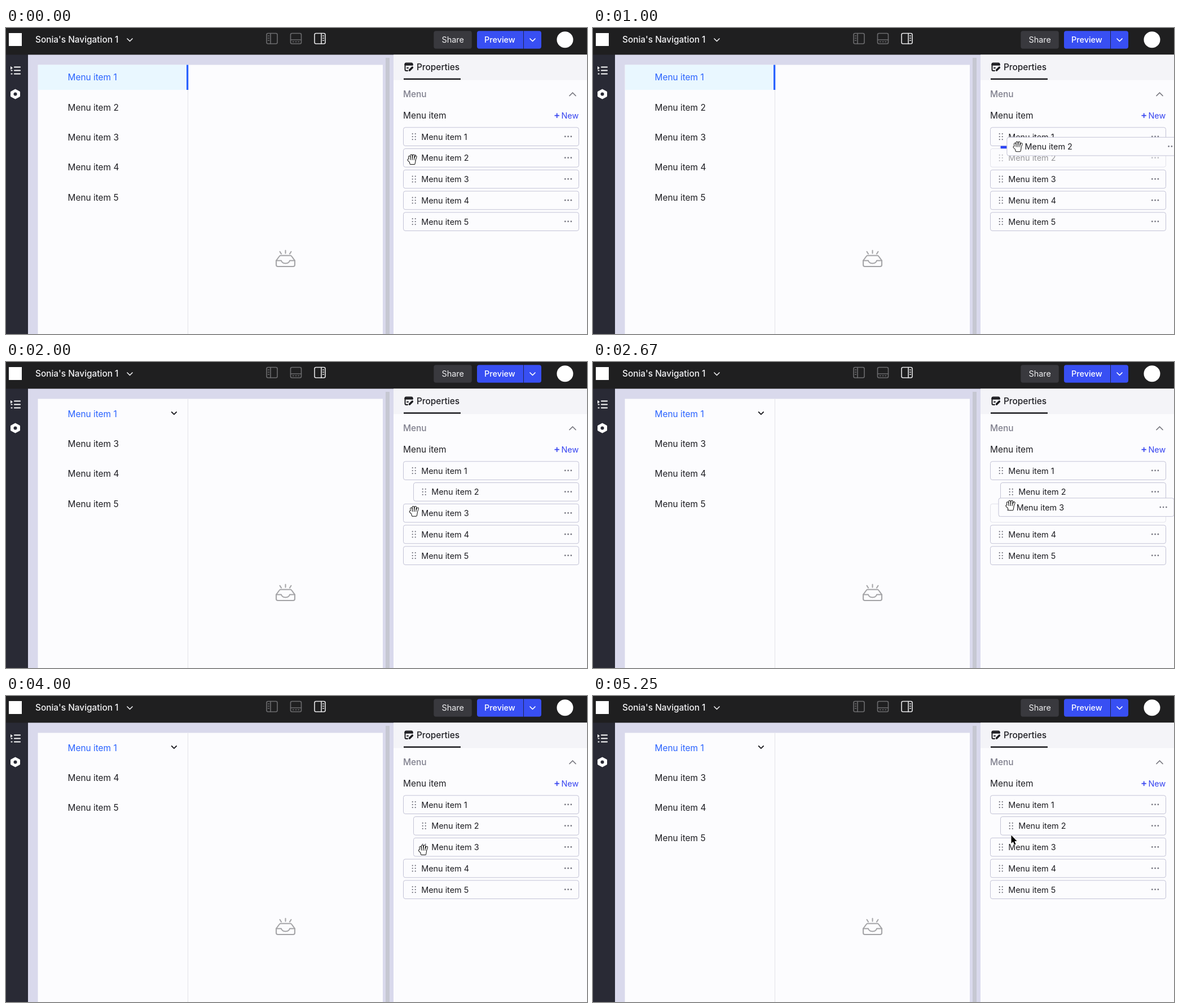
Animation, 1030 px wide and 544 px high, one loop 5580 ms. Source, as an HTML page:

```html
<!DOCTYPE html>
<html lang="en">
<head>
<meta charset="utf-8">
<title>Menu editor</title>
<style>
  html, body { margin: 0; width: 100%; height: 100%; overflow: hidden; background: #fcfcfe; }
  svg { display: block; width: 1030px; height: 544px; font-family: Inter, sans-serif; }
  text { fill: #1d1d22; font-size: 15.4px; white-space: pre; }
  .small { font-size: 14.4px; }
  .medium { font-weight: 500; }
  .line { fill: none; stroke-linecap: round; stroke-linejoin: round; }
  .box { fill: #fcfcfe; stroke: #c3c3d6; }
  .dots { fill: #74747f; }
  .active { fill: #2962ff; }
  .hand { fill: #fff; stroke-linecap: round; stroke-linejoin: round; }
</style>
</head>
<body>
<svg viewBox="0 0 1030 544">
  <defs>
    <path id="open" d="M-5 1L-5.500-4.500M-1.800 0L-2-7M1.400 0L2-7M4.400 0L6-4.500M-7 1L-4 4M-4 2H4L3 7.500H-3Z"/>
    <path id="index" d="M0 1V12M3.400 6V10M6.200 6.500V10M8.700 7.500V10M-3.300 9.500L0 12.500M0 11.500H8L7 16H1.500Z"/>
  </defs>
  <rect width="1030" height="544" fill="#fcfcfe"/>

  <!-- canvas -->
  <rect x="39" y="47" width="648" height="497" fill="#d9d9ec"/>
  <rect x="673" y="53" width="7" height="491" fill="#c6c7d2"/>
  <rect x="56.5" y="65.5" width="611.5" height="479" fill="#fcfcfe"/>
  <path d="M322.5 66V544" stroke="#e3e3e9"/>
  <g id="nav"></g>
  <g class="line" stroke="#a3a3a6" stroke-width="2">
    <path d="M479 413.5L484.5 406Q485.5 404.5 487 404.5H504Q505.5 404.5 506.5 406L512 413.5V421Q512 424 509 424H482Q479 424 479 421Z"/>
    <path d="M479 413.5H488Q489.5 418.5 495.5 418.5T503 413.5H512M495.5 395.5V400.5M485.5 397.5L488 401.5M505.5 397.5L503 401.5"/>
  </g>

  <!-- side bar -->
  <rect y="47" width="39" height="497" fill="#292a35"/>
  <path d="M8 68V74L12 71Z" fill="#fff"/>
  <path class="line" d="M15 69.5H25M15 75.5H25M15 81.5H25M9.5 75.5H10.5M9.5 81.5H10.5" stroke="#fff" stroke-width="2.2"/>
  <path d="M16.5 109L24.5 113.3V121.7L16.5 126L8.5 121.7V113.3Z" fill="#fff" stroke="#fff" stroke-linejoin="round"/>
  <circle cx="16.5" cy="117.5" r="3" fill="#292a35"/>

  <!-- top bar -->
  <rect width="1030" height="47.5" fill="#1f1f20"/>
  <rect x="5" y="9" width="23" height="23" fill="#fff"/>
  <text class="medium" x="52" y="26.3" style="fill:#f4f4f6">Sonia's Navigation 1</text>
  <path class="line" d="M215 19L219.5 23.5L224 19" stroke="#e8e8ea" stroke-width="1.7"/>
  <g class="line" stroke="#6c6c6e" stroke-width="1.6">
    <rect x="462" y="9.5" width="19" height="18.5" rx="2.5"/>
    <path d="M469 9.5V28M464.5 14H466.5M464.5 18H466.5M464.5 22H466.5"/>
    <rect x="504.5" y="9.5" width="19" height="18.5" rx="2.5"/>
    <path d="M504.5 21H523.5M508.5 24.5H510M513.3 24.5H514.8M518 24.5H519.5"/>
  </g>
  <g class="line" stroke="#e6e6e8" stroke-width="1.6">
    <rect x="547" y="9.5" width="19" height="18.5" rx="2.5"/>
    <path d="M559 9.5V28M561.5 14H563.5M561.5 18H563.5M561.5 22H563.5"/>
  </g>
  <rect x="758.3" y="5.3" width="67.5" height="31.4" rx="4" fill="#39393e"/>
  <text class="small" x="772.5" y="26.2" style="fill:#f0f0f2">Share</text>
  <rect x="835" y="5.3" width="114" height="31.4" rx="4" fill="#384ff3"/>
  <path d="M917.5 5V37" stroke="#20254e"/>
  <text class="small medium" x="848" y="26.2" style="fill:#fff">Preview</text>
  <path class="line" d="M929 19L933.5 23.5L938 19" stroke="#fff" stroke-width="1.7"/>
  <circle cx="991" cy="20.7" r="14.5" fill="#fff"/>

  <!-- properties -->
  <rect x="687" y="47.5" width="343" height="45" fill="#f4f4f8"/>
  <g class="line" stroke="#1c1c20" stroke-width="2">
    <path d="M712 76H709.5Q707.5 76 707.5 74V64.5Q707.5 62.5 709.5 62.5H718.5Q720.5 62.5 720.5 64.5V66M711 71H713"/>
    <path d="M708 65H720" stroke-width="3.5"/>
    <path d="M715.5 75L720.3 70.2" stroke-width="3.6"/>
  </g>
  <text class="medium" x="728" y="75.3">Properties</text>
  <rect x="705" y="89.5" width="101" height="2.5" fill="#1c1c20"/>
  <text class="medium" x="704" y="123.2" style="fill:#7e7e8c">Menu</text>
  <path class="line" d="M999 120.5L1004.5 115L1010 120.5" stroke="#74747c" stroke-width="1.7"/>
  <text x="704" y="161.1">Menu item</text>
  <path class="line" d="M973.2 155.7H980.2M976.7 152.2V159.2" stroke="#3644f0" stroke-width="1.7"/>
  <text class="small" x="984.5" y="160.9" style="fill:#3644f0">New</text>

  <g id="rows"></g>
  <rect id="marker" height="4.5" rx="1" fill="#2b44f5"/>
  <g id="card"></g>

  <g id="cursors">
    <g id="grab" class="hand">
      <use href="#open" stroke="#111" stroke-width="4.2"/><use href="#open" stroke="#fff" stroke-width="2.2"/>
    </g>
    <g id="point" class="hand">
      <use href="#index" stroke="#111" stroke-width="4.2"/><use href="#index" stroke="#fff" stroke-width="2.2"/>
    </g>
    <path id="arrow" d="M0 0V14.5L3.3 11.5L5.6 17L8 16L5.8 10.6H10Z" fill="#000" stroke="#fff" stroke-width="1.2" paint-order="stroke"/>
  </g>
</svg>
<script>
const LOOP = 5580, LAG = 40;
const LEFT = 704.5, RIGHT = 1015.5, INDENT = 18;
const TOP = 176.8, PITCH = 37.75, HEIGHT = 32.7, HANDLE = 18.7;
const ITEMS = [1, 2, 3, 4, 5];
const $ = id => document.getElementById(id);
const rowTop = n => TOP + PITCH * (n - 1);

// The mouse rests, then glides to the next place.
const home = { x: 720.5, y: 233.5 };
const glides = [
  { start: 600, end: 1150, x: 761, y: 205.5 },
  { start: 1670, end: 2050, x: 722, y: 268 },
  { start: 2420, end: 2830, x: 750, y: 248 },
  { start: 3500, end: 3900, x: 740, y: 273.5 },
  { start: 4000, end: 4500, x: 710.5, y: 298.5 },
  { start: 4670, end: 5250, x: 741.5, y: 247.4 }
];
const drags = [
  { item: 2, start: 420, end: 1420, nest: true },
  { item: 3, start: 2420, end: 3170, nest: true },
  { item: 3, start: 4000, end: 4750, nest: false }
];

function mouseAt(t) {
  return glides.reduce((from, to) => {
    const u = Math.min(1, Math.max(0, (t - to.start) / (to.end - to.start)));
    const k = u * u * (3 - 2 * u);
    return { x: from.x + (to.x - from.x) * k, y: from.y + (to.y - from.y) * k };
  }, home);
}

function sampleTime(t) {
  if (t < 420) return 0;
  const phase = (t - 420) % 250;
  return t - phase + (phase < 80 ? 0 : 80);
}

const dot = (x, y, r) => `<circle cx="${x}" cy="${y}" r="${r}"/>`;

function rowMarkup(n, x, y, width, opacity = 1) {
  const mid = HEIGHT / 2;
  let dots = '';
  for (const i of [-1, 0, 1]) {
    for (const side of [-2.5, 2.5]) dots += dot(HANDLE + side, mid + 5 * i, 1.1);
    dots += dot(width - 18.9 + 5.3 * i, mid - .2, 1.35);
  }
  return `<g transform="translate(${x} ${y})">
    <rect class="box" width="${width}" height="${HEIGHT}" rx="3.5" style="stroke-opacity:${opacity}"/>
    <g opacity="${opacity}"><g class="dots">${dots}</g>
    <text class="small" x="31.7" y="${mid + 5.4}">Menu item ${n}</text></g></g>`;
}

function navMarkup(nested) {
  const flat = !nested.size;
  const extra = flat
    ? '<path d="M57 65.5H323V110H57Z" fill="#e9f7ff"/><path d="M320 65.5H323.3V110H320Z" fill="#2962ff"/>'
    : '<path class="line" d="M293.7 89L297.9 93.2L302.1 89" stroke="#1d1d22" stroke-width="1.8"/>';
  return extra + ITEMS.filter(n => !nested.has(n)).map((n, i) =>
    `<text x="109.6" y="${(flat ? 93.3 : 97.6) + i * 53.3}" class="${i ? '' : 'active'}">Menu item ${n}</text>`).join('');
}

function cursorKind(mouse, left) {
  const n = ITEMS.find(n => mouse.y >= rowTop(n) && mouse.y <= rowTop(n) + HEIGHT);
  if (!n) return 'arrow';
  return Math.abs(mouse.x - left(n) - HANDLE) < 8 ? 'grab' : 'point';
}

function drawMarker(item, dx, dy) {
  const marker = $('marker');
  const visible = Math.hypot(dx, dy) > 12;
  marker.style.display = visible ? '' : 'none';
  if (!visible) return;
  // Pulling right nests under the row above, pulling left moves out below.
  const x = LEFT + (dx > 0 ? INDENT : 0);
  const row = dx > 0 ? item : item + 1;
  marker.setAttribute('x', x);
  marker.setAttribute('y', rowTop(row) - 4.8);
  marker.setAttribute('width', RIGHT - x);
}

function draw(t) {
  const nested = new Set();
  for (const d of drags) if (d.end <= t) nested[d.nest ? 'add' : 'delete'](d.item);
  const left = n => LEFT + (nested.has(n) ? INDENT : 0);
  const drag = drags.find(d => t > d.start && t < d.end);
  const mouse = mouseAt(t);

  $('nav').innerHTML = navMarkup(nested);
  $('rows').innerHTML = ITEMS.map(n =>
    rowMarkup(n, left(n), rowTop(n), RIGHT - left(n), drag?.item === n ? .45 : 1)).join('');

  let dx = 0, dy = 0;
  $('card').innerHTML = '';
  if (drag) {
    const grip = mouseAt(drag.start), pulled = mouseAt(t - LAG);
    dx = pulled.x - grip.x;
    dy = pulled.y - grip.y;
    const x = left(drag.item);
    $('card').innerHTML = rowMarkup(drag.item, x + dx, rowTop(drag.item) + dy, RIGHT - x);
  }
  drawMarker(drag?.item, dx, dy);

  const kind = drag ? 'grab' : cursorKind(mouse, left);
  for (const shape of $('cursors').children) shape.style.display = shape.id === kind ? '' : 'none';
  $(kind).setAttribute('transform', `translate(${mouse.x} ${mouse.y})`);
}

const start = performance.now();
let shown;
function tick() {
  const t = sampleTime(Math.floor(performance.now() - start) % LOOP);
  if (t !== shown) draw(shown = t);
  requestAnimationFrame(tick);
}
tick();
</script>
</body>
</html>
```
